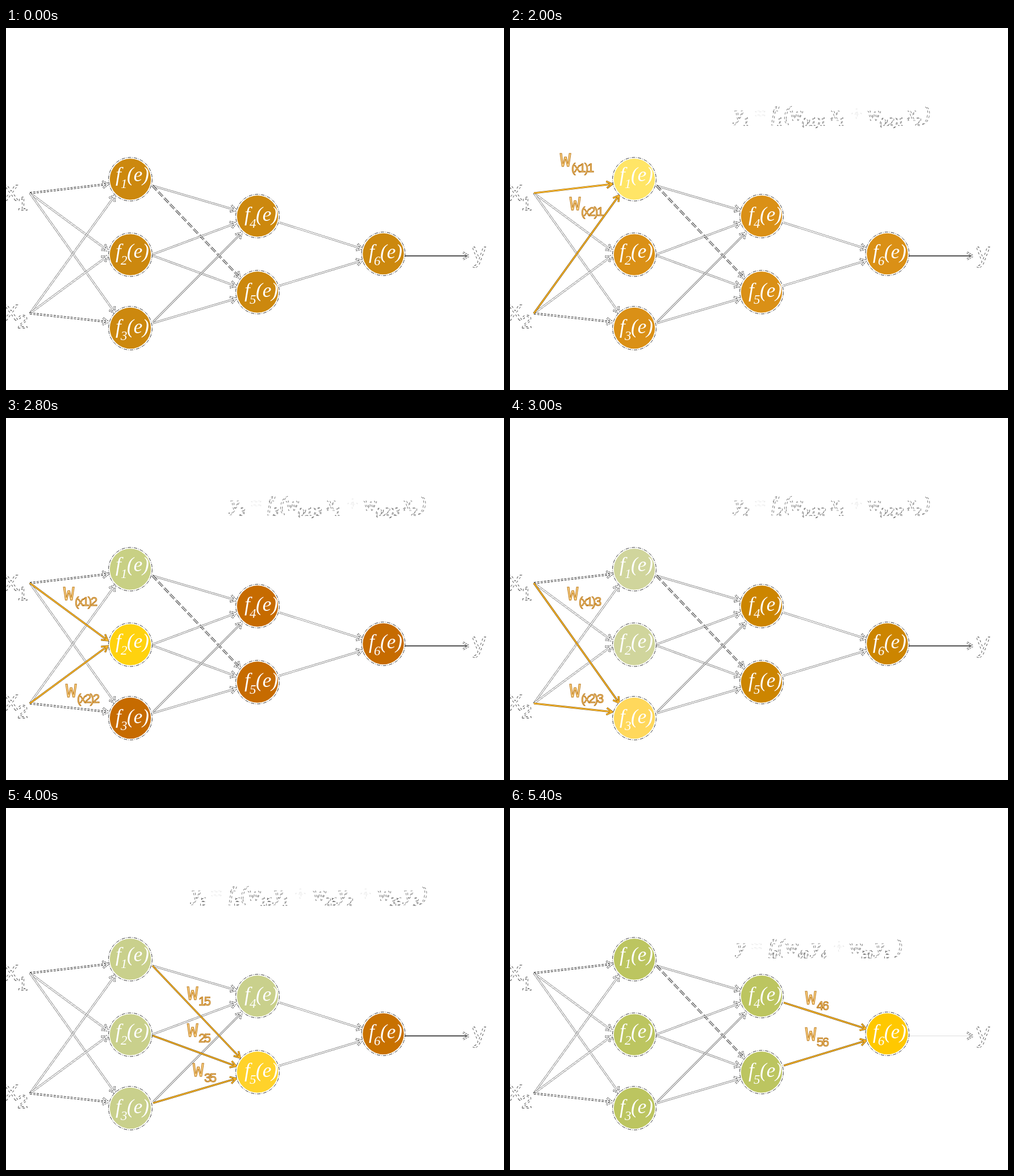
Recreate the animation shown at these times as an HTML page. Size 877 by 638 pixels, loop 6 s.

```html
<!DOCTYPE html>
<html lang="en">
<head>
<meta charset="utf-8">
<title>Forward pass</title>
<style>
html, body { margin: 0; width: 100%; height: 100%; overflow: hidden; background: #fff; }
svg { display: block; width: 100%; height: 100%; }
path { fill: none; }
.halo { stroke: #222; stroke-width: 3.4; stroke-dasharray: 1.2 1; }
.core { stroke: #fff; stroke-width: 1.7; }
.dashed .halo { stroke-dasharray: 4 2; }
.long .halo { stroke-dasharray: 11 4; }
.solid .halo { stroke: #444; stroke-dasharray: none; stroke-width: 3; }
.output .halo { stroke: #333; stroke-dasharray: none; stroke-width: 1.8; }
.output .core { stroke: none; }
.faint .halo { stroke: #ddd; stroke-width: 1; }
g .head.halo { stroke: #222; stroke-width: 3.2; stroke-dasharray: 3 1; }
g .head.core { stroke: #fff; }
g.active .halo { stroke: #7d5200; stroke-width: 3.2; stroke-dasharray: none; }
g.active .core { stroke: #ffb92b; stroke-width: 1.8; }
.ring { fill: #fff; stroke: #222; stroke-width: .9; stroke-dasharray: 6 2 1 2; }
.node { font: italic 35px 'Liberation Serif', serif; fill: #fff; }
.node .sub { font-size: 23px; }
.formula { font: italic 36px 'Liberation Serif', serif; fill: #fff; stroke: #444; stroke-width: .7; stroke-dasharray: 4 4; }
.formula .sub { font-size: 20px; }
.formula .sign { stroke: #ddd; }
.port { font: 52px 'Liberation Sans', sans-serif; fill: #fff; stroke: #333; stroke-width: .8; stroke-dasharray: 4 4; }
.port .sub { font-size: 34px; }
.port .out { font-size: 48px; }
.weight { font: 32px 'DejaVu Sans Mono', monospace; fill: #ffd68a; stroke: #b87414; stroke-width: 1; }
.weight .sub { font: 22px 'Liberation Sans', sans-serif; letter-spacing: -2.5px; }
</style>
</head>
<body>
<svg id="stage" viewBox="0 0 877 638"></svg>
<script>
const LOOP = 6000;

// centre x, centre y, text x, text baseline
const nodes = [
  [219, 266.5, 193, 270], [219, 399.5, 193, 405], [219, 529, 193, 538],
  [443, 331.5, 420, 340], [443, 465.5, 420, 474], [664.5, 398, 639, 406]
];

// name, x1, y1, x2, y2, line style
const edges = [
  ['a1', 42, 291, 180, 275, 'dashed'], ['a2', 42, 291, 179, 392], ['a3', 42, 291, 192, 502],
  ['b1', 42, 503, 192, 295], ['b2', 42, 503, 179, 402], ['b3', 42, 503, 180, 518, 'dashed'],
  ['14', 258, 278, 405, 321], ['15', 258, 278, 412, 440, 'long'],
  ['24', 258, 399, 405, 344], ['25', 258, 401, 405, 455],
  ['34', 259, 518, 415, 361, 'solid'], ['35', 259, 520, 405, 477],
  ['46', 482, 343, 627, 389], ['56', 482, 454, 627, 410],
  ['6y', 703, 401.7, 815, 401.7, 'output']
];

const inputFormula = n =>
  `395 y|411 _${n}|428 =|460 f|470 _${n}|482 (|492 w|514 _(x1)${n}|564 x|579 _1|598 +|629 w|651 _(x2)${n}|699 x|714 _2|728 )`;
const hiddenFormula = n =>
  `327 y|342 _${n}|358 =|392 f|402 _${n}|413 (|425 w|448 _1${n}|472 y|487 _1|506 +|540 w|562 _2${n}|585 y|601 _2|621 +|654 w|676 _3${n}|701 y|717 _3|730 )`;
const outputFormula =
  '399 y|422 =|455 f|461 _6|471 (|484 w|506 _46|531 y|547 _4|567 +|597 w|619 _56|643 y|659 _5|679 )';

// weights: subscript, x, baseline
const steps = [
  { at: 0, idle: '#cc880e' },
  { at: 2000, node: 1, idle: '#da9016', hot: '#ffe566', edges: ['a1', 'b1'], formula: inputFormula(1),
    weights: [['(x1)1', 88, 244], ['(x2)1', 105, 321]] },
  { at: 2500, node: 2, idle: '#c66b00', hot: '#ffd20e', done: '#c8d084', edges: ['a2', 'b2'], formula: inputFormula(3),
    weights: [['(x1)2', 101, 321], ['(x2)2', 105, 492]] },
  { at: 3000, node: 3, idle: '#cc8500', hot: '#ffd85c', done: '#d0d59c', edges: ['a3', 'b3'], formula: inputFormula(2),
    weights: [['(x1)3', 101, 321], ['(x2)3', 105, 492]] },
  { at: 3500, node: 4, idle: '#cd8b28', hot: '#ffd866', done: '#d0d69d', edges: ['14', '24', '34'], formula: hiddenFormula(4),
    weights: [['14', 329, 281], ['24', 329, 345], ['34', 307, 409]] },
  { at: 4000, node: 5, idle: '#c87100', hot: '#ffd22a', done: '#c9d08c', edges: ['15', '25', '35'], formula: hiddenFormula(5),
    weights: [['15', 319, 338], ['25', 319, 403], ['35', 329, 473]] },
  { at: 4500, node: 6, hot: '#ffc800', done: '#bcc560', edges: ['46', '56'], formula: outputFormula, formulaY: 256,
    weights: [['46', 520, 346], ['56', 520, 410]] }
];

const span = (x, y, text, kind = '') => `<tspan x="${x}" y="${y}" class="${kind}">${text}</tspan>`;
const label = (kind, ...spans) => `<text class="${kind}">${spans.join('')}</text>`;
const stroke = (kind, d, extra = '') => `<path class="${kind}" d="${d}" ${extra}/>`;
const isActive = (edge, step) => Boolean(step.edges?.includes(edge[0]));

function drawEdge(edge, step) {
  const [, x1, y1, x2, y2, style = ''] = edge;
  const faint = style === 'output' && step.node === 6 ? ' faint' : '';
  const angle = Math.atan2(y2 - y1, x2 - x1) * 180 / Math.PI;
  const line = `M${x1} ${y1}L${x2} ${y2}`;
  const head = 'M-10-6L0 0L-10 6';
  const place = `transform="translate(${x2} ${y2}) rotate(${angle})"`;
  return `<g class="${isActive(edge, step) ? 'active' : style + faint}">` +
    stroke('halo', line) + stroke('head halo', head, place) +
    stroke('core', line) + stroke('head core', head, place) + '</g>';
}

function drawNode([x, y, left, base], i, step) {
  const n = i + 1;
  const color = n === step.node ? step.hot : n < step.node ? step.done : step.idle;
  return `<circle class="ring" cx="${x}" cy="${y}" r="38.4"/>
    <circle cx="${x}" cy="${y}" r="36.2" fill="${color}"/>` +
    label('node', span(left, base, 'f'), span(left + 9, base + 12, n, 'sub'), span(left + 20, base, '(e)'));
}

function drawFormula(formula, y = 163) {
  return label('formula', ...formula.split('|').map(part => {
    const [x, token] = part.split(' ');
    if (token[0] === '_') return span(x, y + 9, token.slice(1), 'sub');
    return span(x, y, token, '+='.includes(token) ? 'sign' : '');
  }));
}

const drawWeight = ([sub, x, y]) =>
  label('weight', span(x, y, 'W'), span(x + 20, y + 10, sub, 'sub'));

const ports =
  label('port', span(-4, 304, 'x'), span(20, 321, '1', 'sub')) +
  label('port', span(-4, 515, 'x'), span(20, 529, '2', 'sub')) +
  label('port', span(821, 412, 'y', 'out'));

function drawStep(step) {
  const ordered = [...edges].sort((a, b) => isActive(a, step) - isActive(b, step));
  return [
    ports,
    ...ordered.map(edge => drawEdge(edge, step)),
    ...nodes.map((node, i) => drawNode(node, i, step)),
    ...(step.weights || []).map(drawWeight),
    step.formula ? drawFormula(step.formula, step.formulaY) : ''
  ].join('');
}

const stage = document.getElementById('stage');
const start = performance.now();
let shown;

function play() {
  const time = (performance.now() - start) % LOOP;
  const step = steps.findLast(s => s.at <= time);
  if (step !== shown) stage.innerHTML = drawStep(shown = step);
  requestAnimationFrame(play);
}
play();
</script>
</body>
</html>
```
